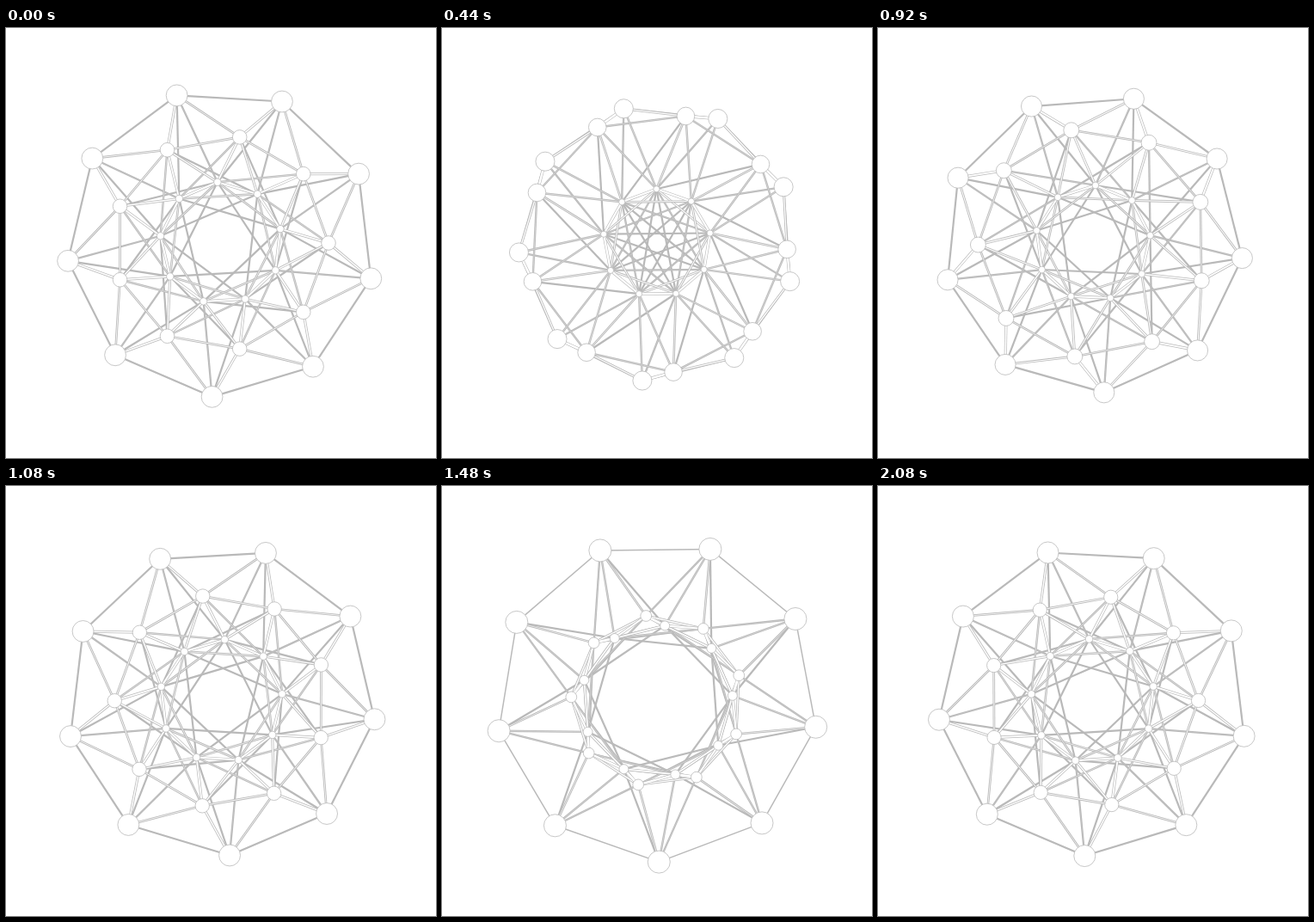
These frames come from a looping animation (500 px wide and 500 px high, 2120 ms). An HTML page with a canvas:

```html
<!DOCTYPE html>
<html lang="en">
<head>
<meta charset="utf-8">
<title>Torus network</title>
<style>
html, body { margin: 0; width: 100%; height: 100%; overflow: hidden; background: #fff; }
canvas { display: block; width: 500px; height: 500px; }
</style>
</head>
<body>
<canvas id="stage" width="500" height="500"></canvas>
<script>
const ctx = document.getElementById('stage').getContext('2d');
const TAU = Math.PI * 2;
const COUNT = 27, STEPS = 53, STEP_MS = 40;
const CENTER = 250, MAJOR = 125, MINOR = 62.5;
const REACH = 132;
const GREY = '#b9b9b9';

// A node at position u on a closed coil that winds nine times round a torus, seen from above.
function nodeAt(u) {
  const angle = u * TAU / COUNT;
  const r = MAJOR + MINOR * Math.cos(u * TAU / 3 - TAU / 4);
  return {
    x: CENTER + r * Math.cos(angle),
    y: CENTER + r * Math.sin(angle),
    size: 0.076 * r - 1.2
  };
}

function findEdges(nodes) {
  const edges = [];
  nodes.forEach((a, i) => {
    for (const b of nodes.slice(i + 1)) {
      const d = Math.hypot(a.x - b.x, a.y - b.y);
      if (d < REACH) edges.push({ a, b, d });
    }
  });
  return edges.sort((p, q) => q.d - p.d);
}

function line({ a, b }, color, width) {
  ctx.strokeStyle = color;
  ctx.lineWidth = width;
  ctx.beginPath();
  ctx.moveTo(a.x, a.y);
  ctx.lineTo(b.x, b.y);
  ctx.stroke();
}

// Long links are thin and solid; short ones widen and show a white core.
function drawEdge(edge) {
  const near = Math.max(0, 115 - edge.d);
  const fade = Math.min(1, (REACH - edge.d) / 6);
  line(edge, GREY, (2.2 + near * 0.016) * fade);
  if (near > 0) line(edge, '#fff', near * 0.03);
}

function drawNode({ x, y, size }) {
  ctx.beginPath();
  ctx.arc(x, y, size, 0, TAU);
  ctx.fillStyle = '#fff';
  ctx.fill();
  ctx.strokeStyle = GREY;
  ctx.lineWidth = 0.8;
  ctx.stroke();
}

function draw(step) {
  const nodes = Array.from({ length: COUNT }, (_, n) => nodeAt(n + step / STEPS));
  ctx.fillStyle = '#fff';
  ctx.fillRect(0, 0, 500, 500);
  findEdges(nodes).forEach(drawEdge);
  nodes.sort((p, q) => p.size - q.size).forEach(drawNode);
}

const start = performance.now();
function tick() {
  draw(Math.floor((performance.now() - start) / STEP_MS) % STEPS);
  requestAnimationFrame(tick);
}
tick();
</script>
</body>
</html>
```
